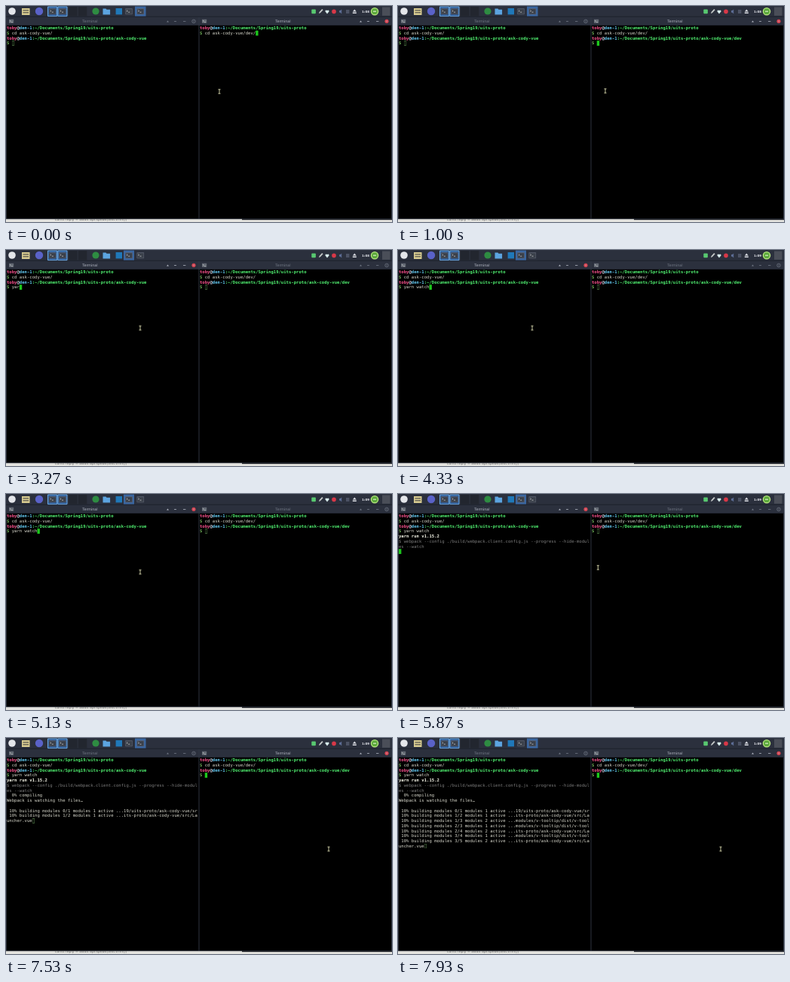
Recreate the animation shown at these times as an HTML page. Size 512x288 px, loop 8 s.

```html
<!DOCTYPE html>
<html lang="en">
<head>
<meta charset="utf-8">
<title>Two terminals</title>
<style>
html, body { margin: 0; width: 100%; height: 100%; overflow: hidden; background: #000; }
svg { position: absolute; left: 0; top: 0; width: 512px; height: 288px; }
svg text { font-family: "DejaVu Sans", sans-serif; }
pre {
  position: absolute; top: 26.2px; margin: 0; width: 680px; height: 684px; overflow: hidden;
  font: 14.95px/18px "DejaVu Sans Mono", monospace; text-rendering: geometricPrecision;
  color: #d8d8cc; transform: scale(.37482); transform-origin: 0 0;
}
#left { left: 1px; }
#right { left: 257.3px; }
.user { color: #f8508c; }
.at { color: #d8d8e8; }
.host { color: #62c8f0; }
.path { color: #50f070; }
.sign { color: #8ce070; }
.bold { color: #f6f6e8; }
.dim { color: #7c7c7c; }
.cursor { box-shadow: inset 0 0 0 2px #4a7040; }
.on .cursor { background: #1cc81c; box-shadow: none; }
.bar { color: #757b88; --close: none; --edge: #757b88; }
.bar.on { color: #b8bcc8; --close: #dc4250; --edge: #dc4250; }
.task { fill: #2b303d; }
.task.on { fill: #3a66a0; }
</style>
</head>
<body>
<svg viewBox="0 0 512 288">
  <defs>
    <g id="bar">
      <rect x="4" y="17.8" width="6.2" height="5" fill="#646a74"/>
      <path d="M5.2 19.2l1.1 1-1.1 1M7 21.6h1.8" fill="none" stroke="#e0e0e0" stroke-width=".6"/>
      <text x="111.5" y="22.3" font-size="4.8" text-anchor="middle" fill="currentColor">Terminal</text>
      <path d="M213 21.4l1.5-2 1.5 2zM223 20.3h3v.8h-3zM235 20.3h3.4v.8H235z" fill="currentColor"/>
      <circle cx="249" cy="20.4" r="2.3" fill="var(--close)" stroke="var(--edge)" stroke-width=".7"/>
      <path d="M248 19.4l2 2m0-2l-2 2" stroke="currentColor" stroke-width=".5"/>
    </g>
    <g id="term">
      <rect x="-4.8" y="-4" width="9.6" height="8" rx=".6" fill="#5c6270"/>
      <rect x="-4.2" y="-3" width="8.4" height="6.4" fill="#3a404a"/>
      <path d="M-3-1.6l1.2 1-1.2 1M-.8 1H1.2" fill="none" stroke="#e4e4e4" stroke-width=".7"/>
    </g>
  </defs>

  <!-- panel and window frames -->
  <rect width="512" height="25.8" fill="#2b303d"/>
  <path d="M0 14.2h512" stroke="#1c202a"/>
  <path d="M.4 26v258M256 15v269M511.6 26v258" stroke="#343a48" stroke-width=".9"/>
  <rect y="283.4" width="512" height=".8" fill="#343a48"/>
  <rect y="284.2" width="512" height="3.8" fill="#e4e4e0"/>
  <rect x="313" y="284" width="199" height="1.2" fill="#14161c"/>
  <svg y="284.2" width="313" height="3.8"><text x="65" y="1.6" font-size="4.6" fill="#5c5c5c">
    const reply = await api.speak(text.trim())</text></svg>

  <!-- launchers -->
  <circle cx="8" cy="7" r="4.8" fill="#e4e6ea"/>
  <path d="M21 3h10.5v9H21z" fill="#d8cc90"/>
  <path d="M22.5 5h7.5v1.5h-7.5zM22.5 8h7.5v1.5h-7.5z" fill="#6c6858"/>
  <circle cx="44" cy="7" r="5.2" fill="#5a62c8"/>
  <g stroke="#74b4f0" stroke-width=".9" fill="#2c5a94">
    <path d="M55.5 1h12.2v12.6H55.5zM68.8 1h12.2v12.6H68.8z"/>
  </g>
  <use href="#term" x="61.6" y="7.2"/><use href="#term" x="74.9" y="7.2"/>
  <path d="M83 1h11.5v12.6H83zM95.8 1h11.5v12.6H95.8z" fill="#22262f"/>
  <circle cx="119" cy="7" r="4.6" fill="#2e8c42"/>
  <path d="M128.5 3.5h4l1 1.2h4.6v6.8h-9.6z" fill="#5ca4e0"/>
  <path d="M145.6 3h8.4v8.4h-8.4z" fill="#2078b8"/>
  <rect id="taskL" class="task" x="156" y=".6" width="14" height="13"/>
  <rect id="taskR" class="task" x="171" y=".6" width="14.5" height="13"/>
  <use href="#term" x="163" y="7.2"/><use href="#term" x="178.3" y="7.2"/>

  <!-- tray -->
  <rect x="405.3" y="4.4" width="5.6" height="5.8" rx="1" fill="#58c870"/>
  <path d="M415 10l.6-2 3.6-4 1.4 1.3-3.7 4z" fill="#c4c8c8"/>
  <path d="M426 10.5l-2.6-3.2q0-2.4 2.6-1.4 2.6-1 2.6 1.4z" fill="#d8ecec"/>
  <circle cx="435" cy="7.4" r="2.8" fill="#d83848"/>
  <path d="M442 6h1.4l1.8-1.6v6l-1.8-1.6H442z" fill="#5c6c94"/>
  <path d="M451 5h4.4v5H451z" fill="#4c5264"/>
  <path d="M459.8 7.6l2.5-3.2 2.5 3.2zM459.8 8.5h5v1.4h-5z" fill="#dcdee4"/>
  <text id="clock" x="477" y="8.9" font-size="4" font-weight="700" text-anchor="middle" fill="#e4e6ec">1:08</text>
  <circle cx="489" cy="7.2" r="4.6" fill="#5ca83c" stroke="#b4e47c" stroke-width="1.4"/>
  <path d="M487 7.2h4" stroke="#eef4dc"/>
  <rect x="499" y="1.5" width="10.5" height="11.4" fill="#4a4e58"/>

  <use id="barL" class="bar" href="#bar"/>
  <use id="barR" class="bar" href="#bar" x="256"/>
</svg>
<pre id="left"></pre>
<pre id="right"></pre>
<svg viewBox="0 0 512 288">
  <path id="mouse" d="M-1.5-2.8H1.5M0-2.8V2.8M-1.5 2.8H1.5" stroke="#e0e0b4" stroke-width=".9"/>
</svg>
<script>
const LOOP = 8000;
const $ = id => document.getElementById(id);
const span = (cls, text) => `<span class="${cls}">${text}</span>`;
const cursor = span('cursor', ' ');
const sign = span('sign', '$') + ' ';
const prompt = (dir = '') => '<b>' + span('user', 'toby') + span('at', '@') +
  span('host', 'den-1') + span('path', ':~/Documents/Spring19/uits-proto' + dir) + '</b>';

const command = 'yarn watch';
const keyTimes = [3000, 3070, 3270, 3400, 3530, 3670, 3800, 3930, 4000, 4070];

// Progress output: count, active modules, file, time
const files = {
  index: '...19/uits-proto/ask-cody-vue/src/index.js',
  app: '...its-proto/ask-cody-vue/src/Launcher.vue',
  tip: '...modules/v-tooltip/dist/v-tooltip.esm.js'
};
const builds = [
  ['0/1', 1, 'index', 7270], ['1/2', 1, 'app', 7470], ['1/3', 2, 'tip', 7600],
  ['2/3', 1, 'tip', 7670], ['2/4', 2, 'app', 7730], ['3/4', 1, 'tip', 7800], ['3/5', 2, 'app', 7870]
];

// Time, x, y
const track = [
  [930, 283, 114], [1470, 222, 108], [1670, 222, 108], [1930, 195, 103], [2270, 178, 104],
  [5470, 178, 104], [5870, 265, 98], [6470, 428, 148]
];

function mouseAt(t) {
  const i = track.findIndex(p => p[0] > t);
  if (i < 0) return track[track.length - 1].slice(1);
  if (i === 0) return track[0].slice(1);
  const [a, b] = [track[i - 1], track[i]];
  const k = (t - a[0]) / (b[0] - a[0]);
  return [a[1] + (b[1] - a[1]) * k, a[2] + (b[2] - a[2]) * k];
}

function leftText(t) {
  const typed = command.slice(0, keyTimes.filter(k => k <= t).length);
  const rows = [prompt(), sign + 'cd ask-cody-vue/', prompt('/ask-cody-vue'), sign + typed];
  if (t < 5200) return rows.join('\n') + cursor;
  if (t >= 5400) rows.push('<b>' + span('bold', 'yarn run v1.15.2') + '</b>');
  if (t >= 5530) rows.push(
    span('dim', '$ webpack --config ./build/webpack.client.config.js --progress --hide-modul'),
    span('dim', 'es --watch'));
  if (t >= 6270) rows.push('  0% compiling');
  if (t >= 6400) rows.push('Webpack is watching the files…', '');
  let rest = '';
  for (const [count, active, file, time] of builds) {
    if (t < time) break;
    const line = ` 10% building modules ${count} modules ${active} active ${files[file]}`;
    rows.push(line.slice(0, 75));
    rest = line.slice(75);
  }
  return rows.join('\n') + '\n' + rest + cursor;
}

function rightText(t) {
  const rows = [prompt(), sign + 'cd ask-cody-vue/dev/'];
  if (t >= 470) rows.push(prompt('/ask-cody-vue/dev'), sign);
  return rows.join('\n') + cursor;
}

function draw(now) {
  const t = now % LOOP;
  const leftOn = t >= 2470 && t < 6600;
  $('left').innerHTML = leftText(t);
  $('right').innerHTML = rightText(t);
  for (const id of ['left', 'taskL', 'barL']) $(id).classList.toggle('on', leftOn);
  for (const id of ['right', 'taskR', 'barR']) $(id).classList.toggle('on', !leftOn);
  $('clock').textContent = t < 4130 ? '1:08' : '1:09';
  $('mouse').setAttribute('transform', `translate(${mouseAt(t)})`);
  requestAnimationFrame(draw);
}
requestAnimationFrame(draw);
</script>
</body>
</html>
```
